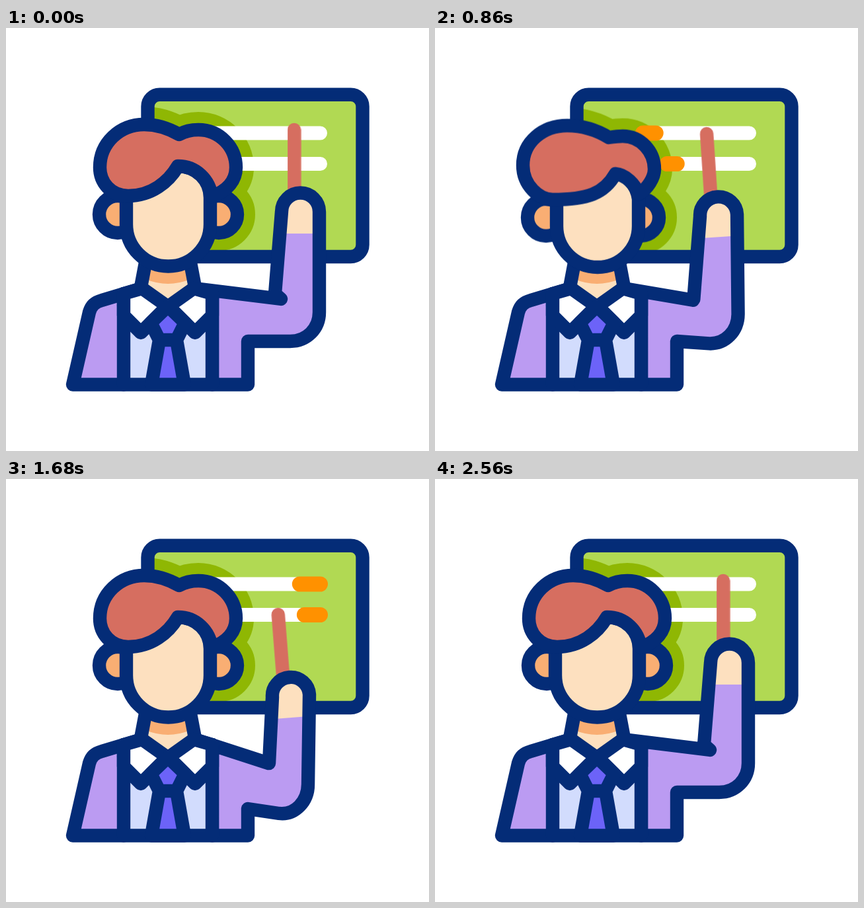
Animation of 640 by 640 pixels, one loop 2.8 s. Source, as an HTML page without scripts:

```html
<!DOCTYPE html>
<html lang="en">
<head>
<meta charset="utf-8">
<title>Teacher at the board</title>
<style>
  html, body { margin: 0; height: 100%; overflow: hidden; background: #fff; }
  svg { display: block; width: 100%; height: 100%; }

  .arm, .hand, .hair, .face, .ear, .bob, .tilt, .marks {
    animation: 2.8s cubic-bezier(.33, 0, .67, 1) infinite;
  }
  .arm { animation-name: arm; }
  .hand { animation-name: hand; }
  .hair { animation-name: hair; fill: #d66e60; }
  .face { animation-name: face; fill: #fde0bf; }
  .ear { animation-name: ear; fill: #f9ae73; }
  .bob { animation-name: bob; }
  .tilt { animation-name: tilt; transform-origin: 252px 325px; }
  .marks { animation-name: marks, show; animation-timing-function: cubic-bezier(.33, 0, .67, 1), step-end; }

  .left { --turn: -1px; }
  .right { --turn: -11px; }

  @keyframes arm {
    0%, 7.14%, 91.43%, 100% { d: path("M286 394L416 410L407 402L417 278A28 28 0 0 1 474 278L474 430C474 455 455 474 430 474L366 474V539.5H312V402"); }
    23.57% {
      d: path("M286 394L386 413L387 412L388 286A28 28 0 0 1 444 278L457 432C458 458 438 478 414 477L366 474V539.5H312V402");
      animation-timing-function: cubic-bezier(.4, 0, .67, .81);
    }
    37.86% {
      d: path("M286 394L397 410L398 408L421 283A28 28 0 0 1 477 288L461 434C459 460 441 479 416 478L366 474V539.5H312V402");
      animation-timing-function: cubic-bezier(.25, .52, .6, 1);
    }
    47.86% { d: path("M286 394L398 408L400 406L428 282A28 28 0 0 1 484 290L462 436C460 462 441 479 416 478L366 474V539.5H312V402"); }
    60% {
      d: path("M286 394L397 430L398 430L403 330A28 28 0 0 1 459 326L457 462C457 488 437 509 413 506L366 499V539.5H312V402");
      animation-timing-function: cubic-bezier(.33, .05, .62, 1);
    }
  }
  @keyframes hand {
    0%, 7.14%, 91.43%, 100% { transform: translate(445.5px, 278px) rotate(0deg); }
    23.57% { transform: translate(415.5px, 282px) rotate(-9.2deg); animation-timing-function: cubic-bezier(.4, 0, .67, .81); }
    37.86% { transform: translate(449px, 285px) rotate(4.5deg); animation-timing-function: cubic-bezier(.25, .52, .6, 1); }
    47.86% { transform: translate(455.5px, 286px) rotate(7deg); }
    60% { transform: translate(431px, 328px) rotate(-4.5deg); animation-timing-function: cubic-bezier(.33, .05, .62, 1); }
  }
  @keyframes hair {
    0%, 7.14%, 60%, 100% { d: path("M260 209C246 233 220 254 185 254C158 254 142 233 142 211C142 174 172 146 209 146C229 146 246 152 262 161C271 156 281 154 291 154C323 154 348 180 348 211C348 230 336 246 311 255C308 230 288 209 260 209Z"); }
    23.57%, 45.7% { d: path("M273 216C256 246 231 255 178 255C158 255 133 234 133 203C133 168 163 143 200 143C226 143 245 150 263 161C270 160 277 159 284 159C311 159 332 182 332 209C332 222 322 238 308 247C303 232 288 217 273 216Z"); }
  }
  @keyframes face {
    0%, 7.14%, 60%, 100% { d: path("M182 254V297A63.5 63.5 0 0 0 309 297V257C309 230 288 209 260 209Z"); }
    23.57%, 45.7% { d: path("M184 254V298A62 62 0 0 0 308 298V257C305 234 288 218 273 216Z"); }
  }
  @keyframes ear {
    0%, 7.14%, 60%, 100% { transform: translateX(0); }
    23.57%, 45.7% { transform: translateX(var(--turn)); }
  }
  @keyframes bob {
    0%, 7.14%, 50%, 100% { transform: translateY(0); }
    35.5% { transform: translateY(var(--drop, 5px)); }
  }
  @keyframes tilt {
    0%, 60%, 91.43%, 100% { transform: rotate(0deg); }
    77% { transform: rotate(-3.9deg); }
  }
  @keyframes marks {
    0%, 25% { d: path("M314.5 159H314.5M351 205.5H351"); }
    51.43% { d: path("M314.5 159H475.5M351 205.5H475.5"); }
    63.4%, 100% { d: path("M475.5 159H475.5M475.5 205.5H475.5"); }
  }
  @keyframes show {
    0%, 63.4%, 100% { opacity: 0; }
    25% { opacity: 1; }
  }
</style>
</head>
<body>
<svg viewBox="0 0 640 640" fill="none" stroke-width="20.4" stroke-linecap="round" stroke-linejoin="round">
  <defs>
    <rect id="board" x="214.5" y="100.7" width="325" height="245.3" rx="18"/>
    <clipPath id="inside"><use href="#board"/></clipPath>
    <path id="collar" d="M204 461L178 435V402L206 394L244 421Z"/>
  </defs>

  <use href="#board" fill="#b1d953"/>
  <!-- Head shadow: the head's outline, widened -->
  <g clip-path="url(#inside)">
    <g class="tilt" stroke="#8fb703" stroke-width="54">
      <g class="bob">
        <circle class="ear left" cx="169" cy="282" r="28"/>
        <circle class="ear right" cx="322" cy="282" r="28"/>
        <path class="hair"/>
      </g>
    </g>
  </g>
  <use href="#board" stroke="#042c77"/>
  <path d="M314.5 159H475.5M351 205.5H475.5" stroke="#fff" stroke-width="21"/>
  <path class="marks" stroke="#ff9100" stroke-width="23"/>

  <g class="hand"><path d="M-9.5 -124V-20" stroke="#d66e60"/></g>
  <path class="arm" fill="#bb9bf2"/>
  <g class="hand"><path d="M-24 33V0A24 28 0 0 1 24 0V33Z" fill="#fde0bf"/></g>

  <g stroke="#042c77">
    <path class="arm"/>
    <path d="M178 539.5H101L126 430C129 420 134 415 145 412L205 394L178 420" fill="#bb9bf2"/>
    <path d="M178 402V539.5H312V402" fill="#d2dcfd"/>
    <g stroke="none">
      <path d="M211 350L204 394L245 421L286 394L279 350Z" fill="#fde0bf"/>
      <path d="M211 350L211 380Q245 394 279 380V350Z" fill="#f9ae73"/>
    </g>
    <path d="M211 355L204 392M279 355L286 392"/>
    <g fill="#fff">
      <use href="#collar"/>
      <use href="#collar" transform="matrix(-1 0 0 1 490 0)"/>
    </g>
    <path d="M232 472L220 539.5H270L258 472ZL219 446L245 421L271 446L258 472" fill="#6c63f8"/>

    <g class="tilt">
      <g class="bob">
        <circle class="ear left" cx="169" cy="282" r="28"/>
        <circle class="ear right" cx="322" cy="282" r="28"/>
      </g>
      <g class="bob" style="--drop:2px"><path class="face"/></g>
      <g class="bob"><path class="hair"/></g>
    </g>
  </g>
</svg>
</body>
</html>
```
